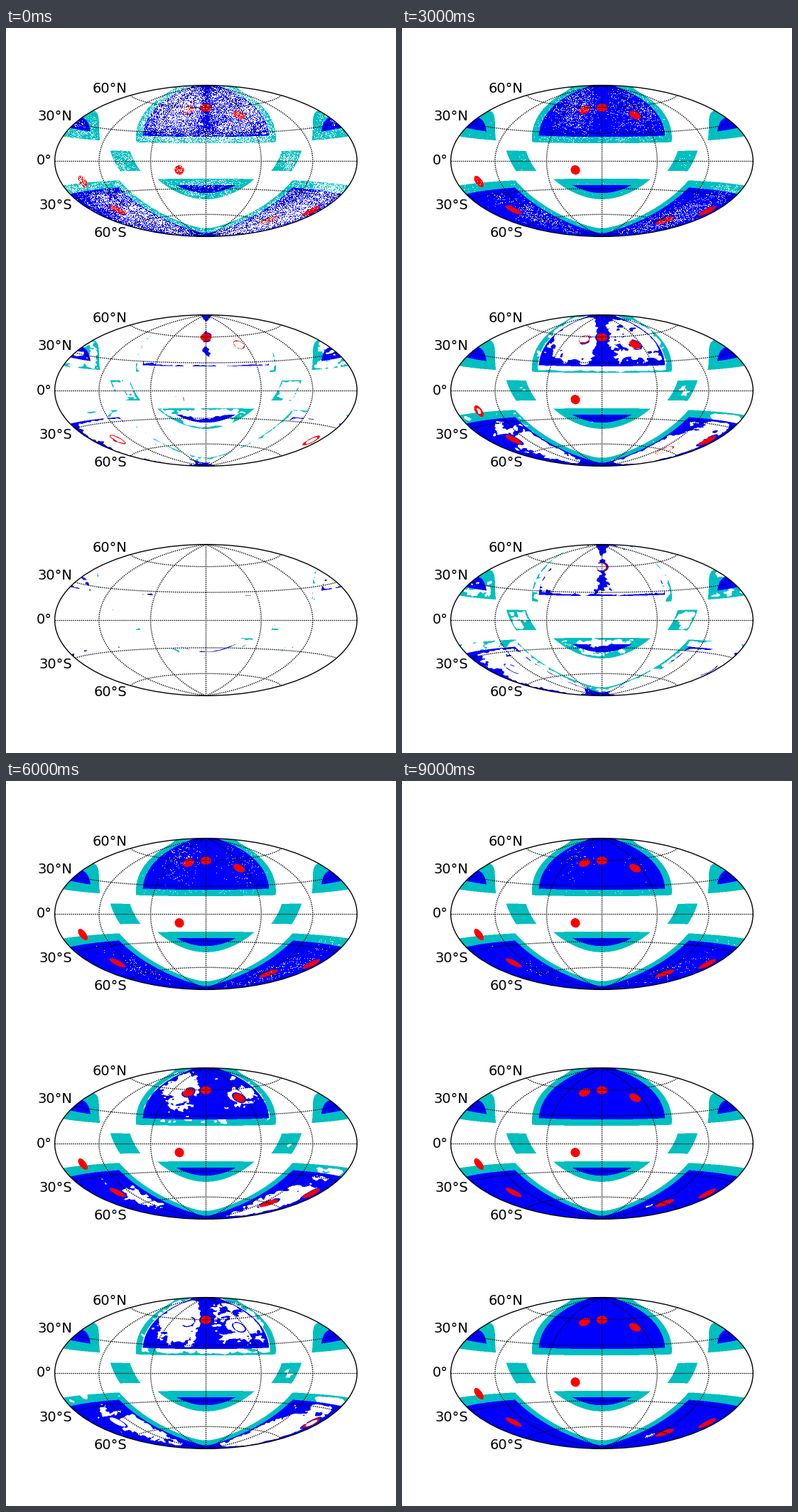
A matplotlib script for the animation above (10 s loop, 549 by 1020 pixels).

```python
import numpy as np
import matplotlib.pyplot as plt
from matplotlib.animation import FuncAnimation
from matplotlib.patches import Ellipse

W, H, DPI = 549, 1020, 96
PX = 72 / DPI                          # points per pixel
CX, RX, RY = 281.4, 212.75, 106.4      # map centre and half axes in pixels
ROWS = (187, 510, 833)                 # equator height of each map
LEFT, BOX_W, BOX_H, SS = 68, 427, 214, 2
YEARS = np.arange(1, 11)
# coverage level that the bottom map has reached after each year
DEEP = [.4, .8, 1.2, 1.6, 2.2, 3.2, 4.8, 6.6, 8.4, 9.8]
PALETTE = np.array([[1, 1, 1], [0, .75, .75], [0, 0, 1], [1, 0, 0]])

# deep fields: x, y, then rim and centre completion year (middle, bottom map)
FIELDS = [
    (281.4, 112, .5, .9, 3.5, 6.5),
    (257, 115, 1.5, 6.5, 9, 9.5),
    (328, 122.5, .6, 2.5, 7.3, 8.8),
    (244, 199.7, .8, 1.7, 7.2, 7.6),
    (108, 216, 1.5, 4.5, 7.5, 9.3),
    (157, 256, .5, 1.5, 7.5, 8.7),
    (370, 271, 1.8, 6, 8.8, 9.5),
    (430, 257.5, .5, 1.1, 4.5, 7.5),
]

# slowly covered areas: x, y, spread along, spread across, tilt, delay
SLOW = [
    (247, 110, 24, 17, -25, 10),
    (330, 122, 20, 14, 25, 8),
    (376, 269, 55, 8, -21, 10),
    (208, 272, 38, 6, 23, 7.5),
    (461, 225, 13, 6, 8, 8),
    (92, 222, 16, 7, -8, 4),
    (398, 187, 9, 8, 0, 4),
    (172, 184, 8, 8, 0, 2),
]

rng = np.random.default_rng(12)


def project(lon, lat):
    """Hammer projection, degrees to pixel offsets from the map centre."""
    lam, phi = np.radians(lon) / 2, np.radians(lat)
    k = np.sqrt(1 + np.cos(phi) * np.cos(lam))
    return RX * np.cos(phi) * np.sin(lam) / k * np.sqrt(1), RY * np.sin(phi) / k


def unproject(x, y):
    """Pixels of the top map to longitude and latitude in radians."""
    u, v = (x - CX) / RX, (ROWS[0] - y) / RY
    z = np.sqrt(np.clip(1 - (u * u + v * v) / 2, .5, 1))
    lon = 2 * np.arctan2(np.sqrt(2) * z * u, 2 * z * z - 1)
    return lon, np.arcsin(np.clip(np.sqrt(2) * z * v, -1, 1))


def separation(lon, lat, lon0, lat0):
    c = (np.sin(lat) * np.sin(lat0)
         + np.cos(lat) * np.cos(lat0) * np.cos(lon - lon0))
    return np.degrees(np.arccos(np.clip(c, -1, 1)))


def near(d, width):
    return np.exp(-(d / width) ** 2)


def bump(x0, y0, sx, sy, tilt=0):
    a = np.radians(tilt)
    dx, dy = X - x0, Y - y0
    p = dx * np.cos(a) + dy * np.sin(a)
    q = dy * np.cos(a) - dx * np.sin(a)
    return np.exp(-((p / sx) ** 2 + (q / sy) ** 2) / 2)


def soft_noise(sx, sy):
    """Unit-variance noise blurred by the given pixel widths."""
    fy = np.fft.fftfreq(X.shape[0])[:, None] * sy * SS
    fx = np.fft.fftfreq(X.shape[1])[None, :] * sx * SS
    spec = np.fft.fft2(rng.normal(size=X.shape))
    n = np.fft.ifft2(spec * np.exp(-2 * np.pi ** 2 * (fx ** 2 + fy ** 2))).real
    return n / n.std()


X, Y = np.meshgrid(LEFT + (np.arange(BOX_W * SS) + .5) / SS,
                   ROWS[0] - BOX_H / 2 + (np.arange(BOX_H * SS) + .5) / SS)
LON, LAT = unproject(X, Y)
rim = 1 - ((X - CX) / RX) ** 2 - ((Y - ROWS[0]) / RY) ** 2
inside = rim > 0

# survey footprint
beta = np.abs(np.degrees(LAT))
pole_n = separation(LON, LAT, 0, np.radians(30))
pole_dist = np.minimum(pole_n, 180 - pole_n)
plane = np.abs(90 - pole_n)
blue = inside & (beta > 26) & (pole_dist < 65)
wide = inside & (beta > 19) & (pole_dist < 72)
patch = inside & (beta < 10) & (plane < 10)
kind = np.where(blue, 2, np.where(wide | patch, 1, 0))

north = LAT > 0
central = pole_n < 90
smile = central & ~north
lobe = ~central & north
south = ~central & ~north


def completion():
    """Year in which each point of the wide survey is fully covered."""
    noise = (.5 * soft_noise(12, 8) + .65 * soft_noise(4, 2.6)
             + .45 * soft_noise(1.6, 1))
    year = 2.2 * np.exp(.42 * noise)
    year += 1.0 * (south & blue & (X > CX))
    year += 3.2 * (~blue & wide & central & north & (pole_dist < 66))
    for x, y, sx, sy, tilt, delay in SLOW:
        year += delay * bump(x, y, sx, sy, tilt) * (1 + .22 * noise)

    # borders, poles and the central column are covered first
    early = np.where(blue, 1.3 * near(beta - 26, 2) + .8 * near(65 - pole_dist, 1.5), 0)
    outer = np.where(patch, np.minimum(10 - beta, 10 - plane),
                     np.minimum(beta - 19, 72 - pole_dist))
    early += np.where(blue, 0, .85 * near(outer, 1.8))
    early += 1.2 * near(90 - beta, 6)
    early += .9 * near(rim, .04) * south
    early += north * (1.3 * bump(CX, 100, 5, 22) + .9 * bump(CX, 131, 6, 6)
                      + .6 * bump(CX, 146, 9, 5) + .6 * bump(205, 146, 8, 5))
    early += .5 * lobe + .45 * smile + .35 * (smile & (np.abs(X - CX) > 32))
    year *= np.exp(-early)

    arc = (.3 + 1.25 * (65 - pole_dist) / 9) * np.exp(.2 * noise)
    year = np.where(smile & blue, arc, year)
    return year, noise


middle, noise = completion()
ring = np.full(X.shape, 99.)
for x, y, *_ in FIELDS:
    ring = np.minimum(ring, separation(LON, LAT, *unproject(x, y)))
middle = np.where(blue & (ring < 6.2), .45 * middle, middle)
middle = np.minimum(middle, 9.7 + 1.4 * bump(345, 275, 5, 1.2, -15))
bottom = np.interp(middle, DEEP, YEARS, right=11)

for x, y, rim2, mid2, rim3, mid3 in FIELDS:
    d = separation(LON, LAT, *unproject(x, y)) / 5
    disc = inside & (d < 1)
    depth = np.clip(1.35 * (1 - d ** 2) + .25 * noise, 0, 1)
    kind[disc] = 3
    middle[disc] = (rim2 + (mid2 - rim2) * depth)[disc]
    bottom[disc] = (rim3 + (mid3 - rim3) * depth)[disc]

# the top map fills with single random pointings
grain = np.kron(rng.exponential(size=(BOX_H, BOX_W)), np.ones((SS, SS)))
top = grain * middle ** .8 / 2.2
LAYERS = (top, middle, bottom)


def picture(layer, year):
    rgb = PALETTE[np.where(layer <= year, kind, 0)]
    return rgb.reshape(BOX_H, SS, BOX_W, SS, 3).mean(axis=(1, 3))


fig = plt.figure(figsize=(W / DPI, H / DPI), dpi=DPI, facecolor="white")
ax = fig.add_axes([0, 0, 1, 1])
ax.axis("off")


def draw_map(cy, layer):
    img = ax.imshow(picture(layer, 1), interpolation="nearest", aspect="auto",
                    extent=(LEFT, LEFT + BOX_W, cy + BOX_H / 2, cy - BOX_H / 2))
    grid = dict(color="black", lw=1.39 * PX, ls=(0, (1, 1)), zorder=3)
    for lon in range(-120, 121, 60):
        x, y = project(lon, np.linspace(-90, 90, 181))
        ax.plot(CX + x, cy - y, **grid)
    for lat in range(-60, 61, 30):
        x, y = project(np.linspace(-180, 180, 361), lat)
        ax.plot(CX + x, cy - y, **grid)
        label = f"{abs(lat)}°" + ("N" if lat > 0 else "S" if lat < 0 else "")
        va = "bottom" if lat > 0 else "top" if lat < 0 else "center"
        ax.text(CX + x[0] - 4.25, cy - y[0], label, ha="right", va=va,
                fontsize=19.44 * PX, family="DejaVu Sans")
    ax.add_patch(Ellipse((CX, cy), 2 * RX, 2 * RY, fill=False,
                         ec="black", lw=1.39 * PX, zorder=4))
    return img


images = [draw_map(cy, layer) for cy, layer in zip(ROWS, LAYERS)]
ax.set_xlim(0, W)
ax.set_ylim(H, 0)


def update(i):
    for img, layer in zip(images, LAYERS):
        img.set_data(picture(layer, YEARS[i]))
    return images


anim = FuncAnimation(fig, update, frames=len(YEARS), interval=1000,
                     repeat=True, repeat_delay=0)
plt.show()
```
